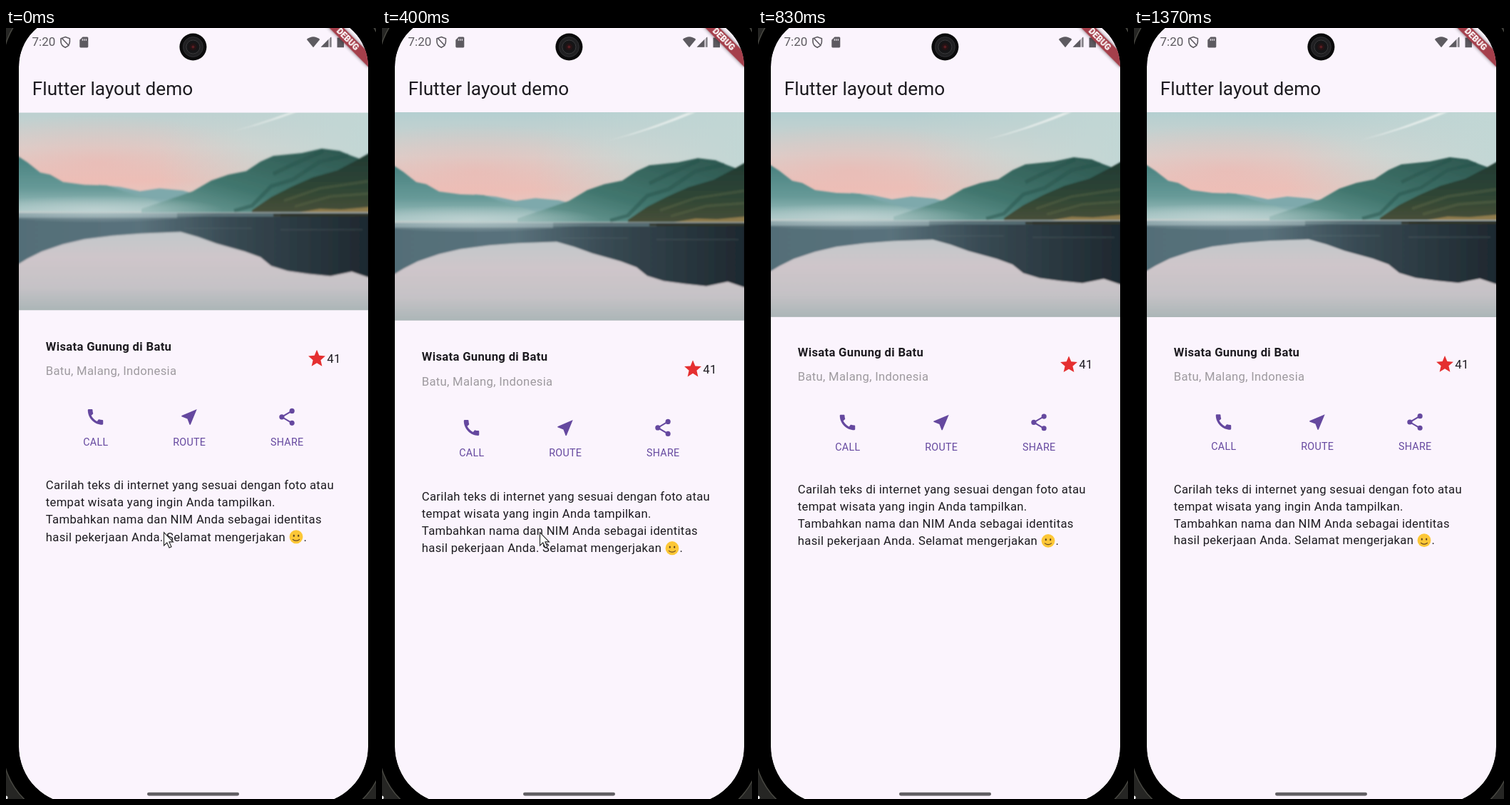
An HTML page for the animation above (1.4 s loop, 519 px wide and 1080 px high).

```html
<!DOCTYPE html>
<html lang="id">
<head>
<meta charset="utf-8">
<title>Flutter layout demo</title>
<style>
html, body { margin: 0; width: 100%; height: 100%; overflow: hidden; background: #000; }
svg { display: block; width: 519px; height: 1080px; }
text { font-family: Roboto, sans-serif; fill: #1d1b20; white-space: pre; }
.body text { font-size: 16.68px; letter-spacing: .3px; }
.body .bold { font-weight: 700; }
.body .muted { fill: #9e9a9f; }
.body .label { font-size: 14.3px; fill: #65489f; text-anchor: middle; }
#page { transform-box: view-box; transform-origin: 0 0; }
.status { fill: #5d5a60; }
</style>
</head>
<body>
<svg viewBox="0 0 519 1080">
  <defs>
    <clipPath id="screen"><path id="glass" d="M18 54A70 70 0 0 1 88-16H438A70 70 0 0 1 508 54V1007A80 80 0 0 1 428 1087H98A80 80 0 0 1 18 1007Z"/></clipPath>
    <clipPath id="view"><rect x="17.5" y="118.5" width="490.5" height="970"/></clipPath>
    <clipPath id="frame"><rect x="17.5" y="118" width="490.5" height="286.3"/></clipPath>
    <linearGradient id="sky" x1="0" y1="0" x2="0" y2="1">
      <stop offset="0" stop-color="#b4cfd0"/><stop offset=".4" stop-color="#d8d4d0"/>
      <stop offset=".7" stop-color="#ebc4bc"/><stop offset="1" stop-color="#e2d2cc"/>
    </linearGradient>
    <radialGradient id="glow">
      <stop offset="0" stop-color="#f2b0aa" stop-opacity=".5"/><stop offset="1" stop-color="#f2b0aa" stop-opacity="0"/>
    </radialGradient>
    <linearGradient id="cool">
      <stop offset=".4" stop-color="#c2d7d5" stop-opacity="0"/><stop offset="1" stop-color="#c2d7d5"/>
    </linearGradient>
    <linearGradient id="ridge" x1="0" y1="0" x2="0" y2="1">
      <stop offset="0" stop-color="#467f7d"/><stop offset=".6" stop-color="#679a98"/><stop offset="1" stop-color="#a8c6c5"/>
    </linearGradient>
    <linearGradient id="hill" x1="1" y1="0" x2="0" y2="1">
      <stop offset="0" stop-color="#2b544c"/><stop offset=".6" stop-color="#42776f"/><stop offset="1" stop-color="#7aa8a4"/>
    </linearGradient>
    <linearGradient id="slope" x1="0" y1="0" x2="0" y2="1">
      <stop offset="0" stop-color="#203a33"/><stop offset=".6" stop-color="#304635"/><stop offset="1" stop-color="#4a5038"/>
    </linearGradient>
    <linearGradient id="water" x1="0" y1="0" x2="0" y2="1">
      <stop offset="0" stop-color="#b8c8ca"/><stop offset=".45" stop-color="#cfc6ca"/>
      <stop offset=".75" stop-color="#c5c2c6"/><stop offset="1" stop-color="#a8b4b5"/>
    </linearGradient>
    <linearGradient id="mirror">
      <stop offset="0" stop-color="#536e78"/><stop offset=".35" stop-color="#5a727c"/>
      <stop offset=".6" stop-color="#384a53"/><stop offset="1" stop-color="#1d272e"/>
    </linearGradient>
    <radialGradient id="mist">
      <stop offset="0" stop-color="#c3d5d5" stop-opacity=".8"/><stop offset="1" stop-color="#c3d5d5" stop-opacity="0"/>
    </radialGradient>
    <filter id="soft"><feGaussianBlur stdDeviation=".9"/></filter>
    <filter id="shade" x="-20%" y="-60%" width="140%" height="220%"><feGaussianBlur stdDeviation="2.5"/></filter>
  </defs>

  <rect width="519" height="1080" fill="#262624"/>
  <rect x="-5" y="-50" width="536" height="1160" rx="103" stroke="#484842" stroke-width="1.5"/>
  <circle cx="0" cy="1078" r="2.5" fill="#eee"/>

  <g clip-path="url(#screen)">
    <use href="#glass" fill="#fbf4fd"/>
    <text x="36.8" y="93.5" font-size="26.2">Flutter layout demo</text>

    <g clip-path="url(#view)">
      <g id="page" class="body">
        <g clip-path="url(#frame)">
          <rect x="17" y="118" width="492" height="153" fill="url(#sky)"/>
          <ellipse cx="130" cy="200" rx="240" ry="65" fill="url(#glow)"/>
          <rect x="17" y="118" width="492" height="153" fill="url(#cool)"/>
          <g filter="url(#soft)">
            <path d="M318 157Q385 141 442 117L428 119Q370 143 318 157Z" fill="#e9efed"/>
            <path d="M130 231L160 234L188 240L215 236L248 239L275 246V268H130Z" fill="#7ea9ac"/>
            <path d="M10 187L30 200L48 214L62 217L80 227L110 231L142 232L165 240L190 247L225 258L250 268H10Z" fill="url(#ridge)"/>
            <path d="M190 264L230 251L262 240L288 225L312 217L337 212L357 199L375 191L415 187L443 181L468 184L485 191L510 200V269H190Z" fill="url(#hill)"/>
            <path d="M480 190L440 199L402 224L372 233L345 260L320 267M445 184L400 204L375 216" fill="none" stroke="#28544c" stroke-width="5" opacity=".5"/>
            <path d="M345 266L372 248L400 234L430 221L465 211L490 198L515 184V272H345Z" fill="url(#slope)"/>
            <path d="M390 253L440 236L508 226M405 261L455 247L508 243" fill="none" stroke="#65704a" stroke-width="4" opacity=".35"/>
            <path d="M405 270L440 264L470 265L515 261V273H405Z" fill="#8f7c4e"/>
            <rect x="10" y="269" width="505" height="140" fill="url(#water)"/>
            <path d="M10 270H515V361L485 351L455 357L425 354L395 350L372 343L357 331L335 323L295 312L270 303L245 296L190 298L150 301L110 306L80 313L50 323L30 333L10 345Z" fill="url(#mirror)"/>
            <path d="M17 273H240" stroke="#a7bec2" stroke-width="7" opacity=".55"/>
            <path d="M240 273H385" stroke="#728d92" stroke-width="4" opacity=".6"/>
            <path d="M375 273H508" stroke="#323528" stroke-width="3"/>
            <path d="M250 291H345M385 293H500" stroke="#687a7d" stroke-width="2" opacity=".25"/>
          </g>
          <ellipse cx="125" cy="265" rx="180" ry="19" fill="url(#mist)"/>
        </g>

        <text class="bold" x="55.8" y="460">Wisata Gunung di Batu</text>
        <text class="muted" x="55.8" y="494">Batu, Malang, Indonesia</text>
        <path transform="translate(421.7 456.7) scale(1.192)" fill="#e52f30" d="M12 17.27L18.18 21l-1.64-7.03L22 9.24l-7.19-.61L12 2 9.19 8.63 2 9.24l5.46 4.73L5.82 21z"/>
        <text x="450.3" y="477">41</text>

        <g fill="#65489f">
          <path transform="translate(111.2 537.7) scale(1.192)" d="M20.01 15.38c-1.23 0-2.42-.2-3.53-.56-.35-.12-.74-.03-1.01.24l-1.57 1.97c-2.83-1.35-5.48-3.9-6.89-6.83l1.95-1.66c.27-.28.35-.67.24-1.02-.37-1.11-.56-2.3-.56-3.53 0-.54-.45-.99-.99-.99H4.19C3.65 3 3 3.24 3 3.99 3 13.28 10.73 21 20.01 21c.71 0 .99-.63.99-1.18v-3.45c0-.54-.45-.99-.99-.99z"/>
          <path transform="translate(242.7 537.7) scale(1.192)" d="M21 3L3 10.53v.98l6.84 2.65L12.48 21h.98z"/>
          <g transform="translate(379.7 537.7) scale(1.192)">
            <path d="M18 5L6 12L18 19" fill="none" stroke="#65489f" stroke-width="1.7"/>
            <circle cx="18" cy="5" r="3"/><circle cx="6" cy="12" r="3"/><circle cx="18" cy="19" r="2.95"/>
          </g>
        </g>
        <text class="label" x="125.8" y="591.3">CALL</text>
        <text class="label" x="257.2" y="591.3">ROUTE</text>
        <text class="label" x="394.2" y="591.3">SHARE</text>

        <text x="55.8" y="651.9">Carilah teks di internet yang sesuai dengan foto atau</text>
        <text x="55.8" y="675.7">tempat wisata yang ingin Anda tampilkan.</text>
        <text x="55.8" y="699.5">Tambahkan nama dan NIM Anda sebagai identitas</text>
        <text x="55.8" y="723.4">hasil pekerjaan Anda. Selamat mengerjakan</text>
        <g transform="translate(407 717.7)">
          <circle r="9.4" fill="#fcc737"/>
          <path d="M-4.6 3.6Q0 7.2 4.6 3.6" fill="none" stroke="#6b4a20" stroke-width="1.2" stroke-linecap="round"/>
          <ellipse cx="-3.2" cy="-1.6" rx="1.1" ry="1.6" fill="#5c4020"/><ellipse cx="3.2" cy="-1.6" rx="1.1" ry="1.6" fill="#5c4020"/>
        </g>
        <text x="417.5" y="723.4">.</text>
      </g>
    </g>

    <g class="status">
      <text class="status" x="36.5" y="25.3" font-size="17">7:20</text>
      <path d="M83.2 12.5L89.4 14.8V19.5Q89 25 83.2 27.3Q77.4 25 77 19.5V14.8ZM78.5 14.5L88.5 25" fill="none" stroke="#5d5a60" stroke-width="1.6"/>
      <path d="M107.5 12.5H114Q115.3 12.5 115.3 14V26Q115.3 27.4 114 27.4H104.6Q103.3 27.4 103.3 26V16.7Z"/>
      <path d="M107.3 15V18M109.8 15V18M112.3 15V18" stroke="#fbf4fd"/>
      <path d="M421.8 16Q431 8.5 440.3 16L431 27.2Z"/>
      <path d="M456.3 12V26.7H441.6Z" opacity=".4"/>
      <path d="M452 16.3V26.7H441.6ZM455 13.3H456.3V26.7H455Z"/>
      <path d="M467 12H471.5V13.6H474V27.2H464.5V13.6H467Z"/>
    </g>
    <rect x="198" y="1070.7" width="129" height="4.7" rx="2.3" fill="#625f64"/>

    <g transform="translate(479.4 15.7) rotate(45)">
      <rect x="-48" y="-7.2" width="96" height="14.4" opacity=".5" filter="url(#shade)"/>
      <rect x="-48" y="-7.2" width="96" height="14.4" fill="#a53f4b"/>
      <text y="4.3" text-anchor="middle" font-size="12.1" font-weight="900" style="fill:#fff">DEBUG</text>
    </g>
  </g>

  <g transform="translate(262.4 26.5)">
    <circle r="19" fill="#0b0b0c"/>
    <circle r="14" fill="#202022" stroke="#303033"/>
    <circle r="9.5" fill="#151517" stroke="#39393b"/>
    <circle r="5" fill="#241315"/>
    <circle r="2" fill="#5a1d22"/>
  </g>

  <path id="pointer" d="M221.5 706.5V725L225.8 721L229 728L232 726.7L228.9 719.9H234.5Z" fill="#fff" stroke="#222" stroke-width="1.1"/>
</svg>
<script>
const LOOP = 1400, TOP = 118, BOTTOM = 1090;

// [ms, stretch, easing]: negative pulls from the bottom edge, positive from the top
const steps = [
  [0, -.0132, 'ease-out'],
  [150, -.02, 'ease-in-out'],
  [270, -.019, 'ease-in'],
  [335, 0, 'ease-out'],
  [400, .0183, 'ease-out'],
  [470, .0195, 'ease-in'],
  [630, .0133, 'cubic-bezier(.3,.5,.6,1)'],
  [830, .001, 'ease-out'],
  [980, 0, 'linear'],
  [LOOP, 0, 'linear']
];

const stretch = k => {
  const edge = k < 0 ? BOTTOM : TOP, size = Math.abs(k);
  return `translateY(${-edge * size}px) scaleY(${1 + size})`;
};

const loop = (id, frames) =>
  document.getElementById(id).animate(frames, { duration: LOOP, iterations: Infinity });

loop('page', steps.map(([ms, k, easing]) => ({ offset: ms / LOOP, transform: stretch(k), easing })));

const hide = 570 / LOOP;
loop('pointer', [
  { offset: 0, opacity: 1 }, { offset: hide, opacity: 1 },
  { offset: hide, opacity: 0 }, { offset: 1, opacity: 0 }
]);
</script>
</body>
</html>
```
